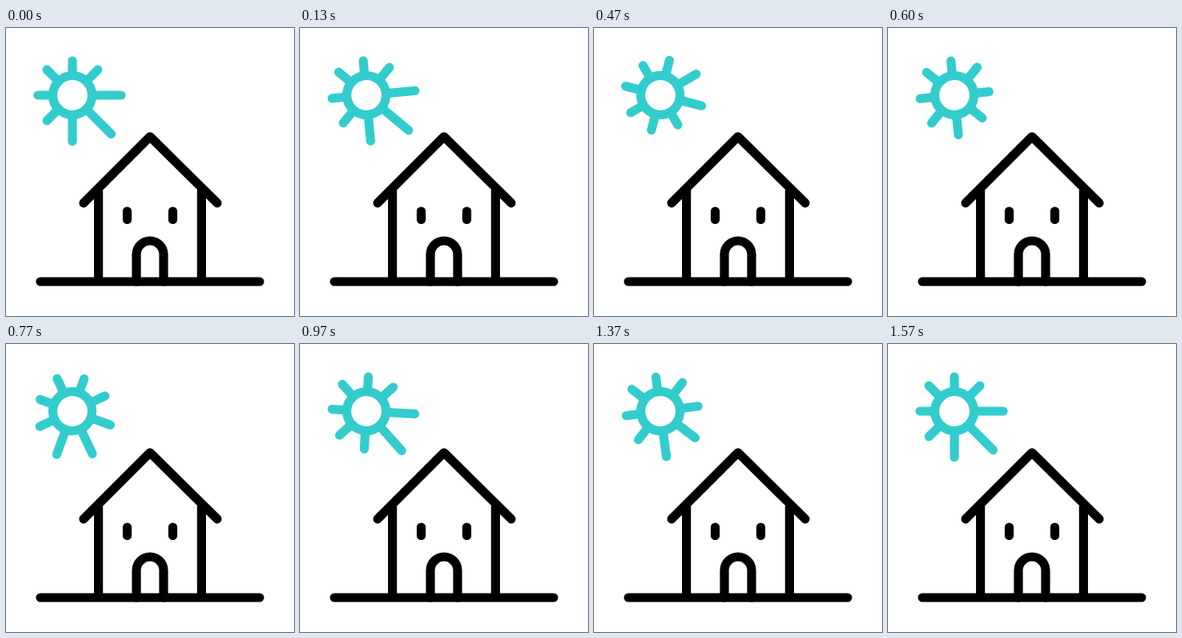
These frames come from a looping animation (360x360 px, 1.67 s). An HTML page:

```html
<!DOCTYPE html>
<html lang="en">
<head>
<meta charset="utf-8">
<title>House and sun</title>
<style>
  html, body { margin: 0; width: 100%; height: 100%; overflow: hidden; background: #fff; }
  svg { display: block; width: 100vw; height: 100vh; }
</style>
</head>
<body>
<svg viewBox="0 0 360 360" fill="none" stroke-width="11.2" stroke-linecap="round" stroke-linejoin="round">
  <g id="sun" stroke="#33cccd">
    <circle r="24.5"/>
  </g>
  <g stroke="#000">
    <path d="M43 317H317M115.6 204V317M244.4 204V317"/>
    <path d="M97 218.8L180 135.8L264 218.8"/>
    <path d="M151.5 229V239.5M208.5 229V239.5"/>
    <path d="M163 317V283A17 17 0 0 1 197 283V317"/>
  </g>
</svg>
<script>
const LOOP = 1670;
const FPS = 30;
const SHRINK = 10; // frames a long ray takes to shorten
const GROW = 9;    // frames it takes to grow back
const sun = document.getElementById('sun');

// Key poses of the rocking: [frame, degrees]
const swing = [[1, 0], [12.5, -33], [23.3, 20], [35, -15], [47, 0]];

// The three rays facing the house pulse twice per loop.
const longRays = {
  0: { full: 61, delay: 9 },
  45: { full: 68.5, delay: 8 },
  90: { full: 57.5, delay: 3.7 }
};

const clamp = p => Math.min(1, Math.max(0, p));
const ease = p => (1 - Math.cos(Math.PI * clamp(p))) / 2;

// Each leg adds its eased share of the turn.
function swingAt(n) {
  return swing.slice(1).reduce((sum, [end, angle], i) => {
    const [begin, from] = swing[i];
    return sum + (angle - from) * ease((n - begin) / (end - begin));
  }, 0);
}

// 0 = full length, 1 = short
function pulse(n) {
  const period = SHRINK + GROW;
  if (n < 0 || n > 2 * period) return 0;
  const t = n % period;
  return t < SHRINK ? ease(t / SHRINK) : 1 - ease((t - SHRINK) / GROW);
}

const rays = Array.from({ length: 8 }, (_, i) => {
  const angle = i * 45;
  const line = document.createElementNS('http://www.w3.org/2000/svg', 'line');
  line.setAttribute('x1', 27);
  line.setAttribute('transform', `rotate(${angle})`);
  sun.append(line);
  const short = i % 2 ? 45 : 43;
  return { line, short, full: short, delay: 0, ...longRays[angle] };
});

function draw(time) {
  const n = Math.floor((time % LOOP) * FPS / 1000 + 0.1);
  sun.setAttribute('transform', `translate(83 84) rotate(${swingAt(n)})`);
  for (const { line, short, full, delay } of rays) {
    line.setAttribute('x2', full + (short - full) * pulse(n - delay));
  }
}

const start = performance.now();
function tick() {
  draw(performance.now() - start);
  requestAnimationFrame(tick);
}
tick();
</script>
</body>
</html>
```
